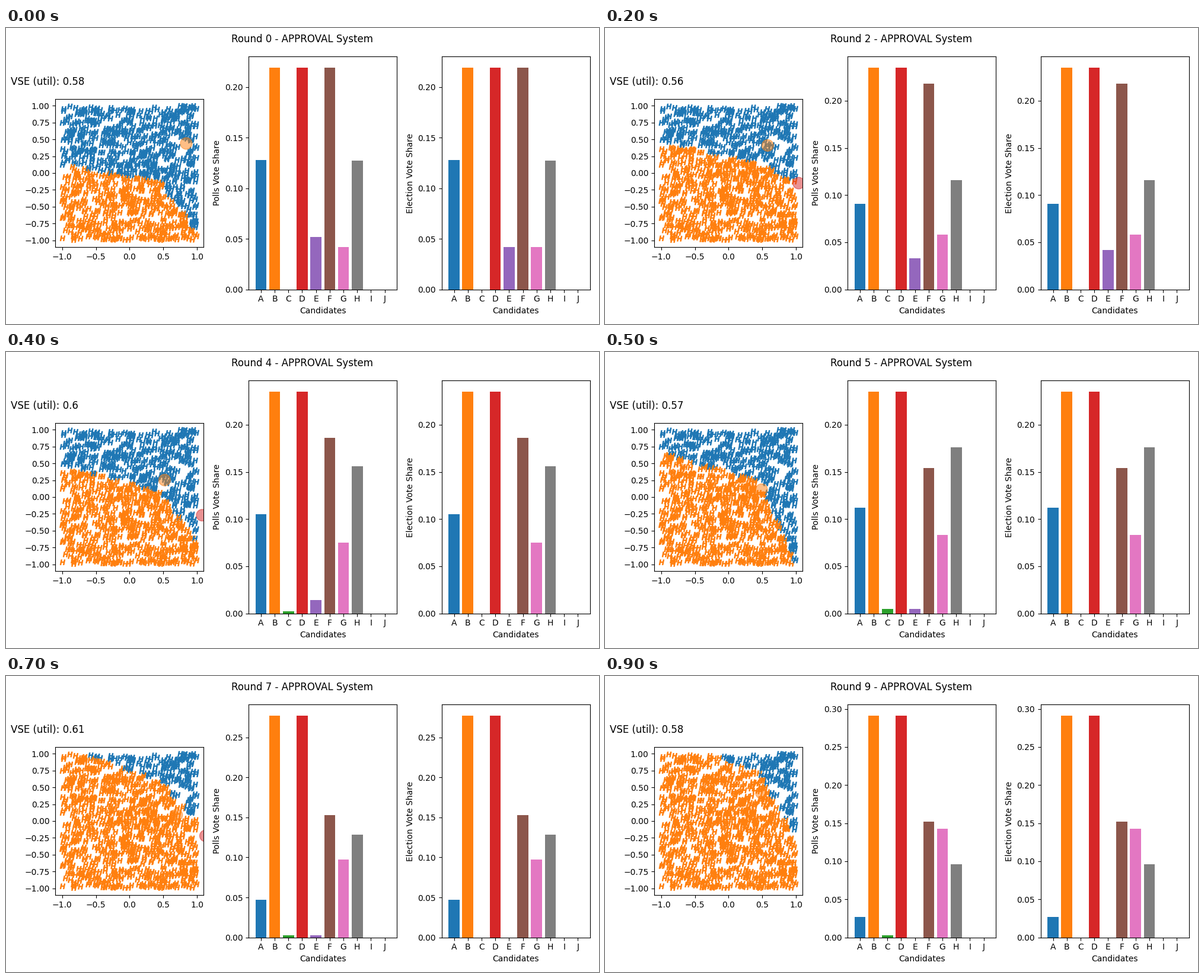
Animation of 1000x500 px, one loop 1 s. Source, as a matplotlib script:

```python
import numpy as np
import matplotlib.pyplot as plt
from matplotlib.animation import FuncAnimation
from matplotlib.ticker import MultipleLocator

W, H, DPI = 1000, 500, 100
ROUNDS = 10
NAMES = "ABCDEFGHIJ"
SIDE = 250.1  # panel width in pixels

# Key points per track, as {round: value}
VSE = {0: .58, 2: .56, 3: .63, 5: .57, 6: .60, 8: .62, 9: .58}

SHARES = {
    "A": {0: .128, 2: .091, 5: .112, 6: .057, 9: .027},
    "B": {0: .219, 2: .235, 5: .235, 8: .298, 9: .291},
    "F": {0: .219, 3: .218, 5: .154, 9: .152},
    "G": {0: .042, 5: .083, 8: .104, 9: .143},
    "H": {0: .127, 2: .116, 5: .176, 6: .169, 8: .088, 9: .096},
}
SHARES["D"] = SHARES["B"]
POLLS = SHARES | {"C": {3: 0, 5: .005, 6: .003}, "E": {0: .052, 5: .005, 9: 0}}
VOTES = SHARES | {"E": {2: .042, 3: 0}}

ORANGE_X = {0: .84, 2: .58, 5: .49, 6: .69, 8: .71, 9: .485}
ORANGE_Y = {0: .44, 3: .395, 5: .11, 8: .08, 9: .42}
RED_X = {0: 1.25, 2: 1.04, 3: .905, 5: 1.25, 6: 1.06, 9: 1.26}
RED_Y = {2: -.15, 3: -.27, 6: -.27, 9: -.12}

# The border between the camps: height at the left edge, and how hard it bends
TOP = {0: .12, 2: .46, 3: .28, 5: .66, 6: 1.0, 9: 1.3}
BEND = {0: 1.2, 2: .25, 3: .3, 5: 1.9, 6: .9, 8: .6, 9: 1.4}


def at(track, k):
    return float(np.interp(k, list(track), list(track.values())))


def border(x, k):
    """A gentle slope that steepens on the right-hand side."""
    slope = .17 + .025 * k
    return at(TOP, k) - slope * (x + 1) - at(BEND, k) * np.maximum(x - .45, 0)


def panel(right, height):
    return fig.add_axes([(right - SIDE) / W, .51 - height / H / 2,
                         SIDE / W, height / H])


def bar_panel(right, label):
    ax = panel(right, 393.2)
    bars = ax.bar(list(NAMES), [0] * len(NAMES),
                  color=[f"C{i}" for i in range(len(NAMES))])
    ax.set_xlabel("Candidates")
    ax.set_ylabel(label)
    ax.yaxis.set_major_locator(MultipleLocator(.05))
    ax.yaxis.set_major_formatter("{x:.2f}")
    return ax, bars


fig = plt.figure(figsize=(W / DPI, H / DPI), dpi=DPI)
title = fig.suptitle("")
vse_text = fig.text(8.2 / W, 1 - 96 / H, "", fontsize=12)

space = panel(333.4, 250)
space.set(xlim=(-1.1, 1.1), ylim=(-1.1, 1.1),
          xticks=np.arange(-1, 1.1, .5), yticks=np.arange(-1, 1.1, .25))
vx, vy = np.random.default_rng(4).uniform(-1, 1, (2, 1000))
voters = space.scatter(vx, vy, marker="$H$")
winners = space.scatter([0, 0], [0, 0], s=200, c=["C1", "C3"], alpha=.5)

charts = [(*bar_panel(659.3, "Polls Vote Share"), POLLS),
          (*bar_panel(985, "Election Vote Share"), VOTES)]


def update(k):
    title.set_text(f"Round {k} - APPROVAL System")
    vse_text.set_text(f"VSE (util): {round(at(VSE, k), 2)}")

    voters.set_color(np.where(vy > border(vx, k), "C0", "C1"))
    winners.set_offsets([(at(ORANGE_X, k), at(ORANGE_Y, k)),
                         (at(RED_X, k), at(RED_Y, k))])

    for ax, bars, shares in charts:
        for name, bar in zip(NAMES, bars):
            bar.set_height(at(shares[name], k) if name in shares else 0)
        ax.set_ylim(0, 1.05 * at(shares["B"], k))
    return []


anim = FuncAnimation(fig, update, frames=ROUNDS, interval=100,
                     repeat=True, repeat_delay=0)
plt.show()
```
